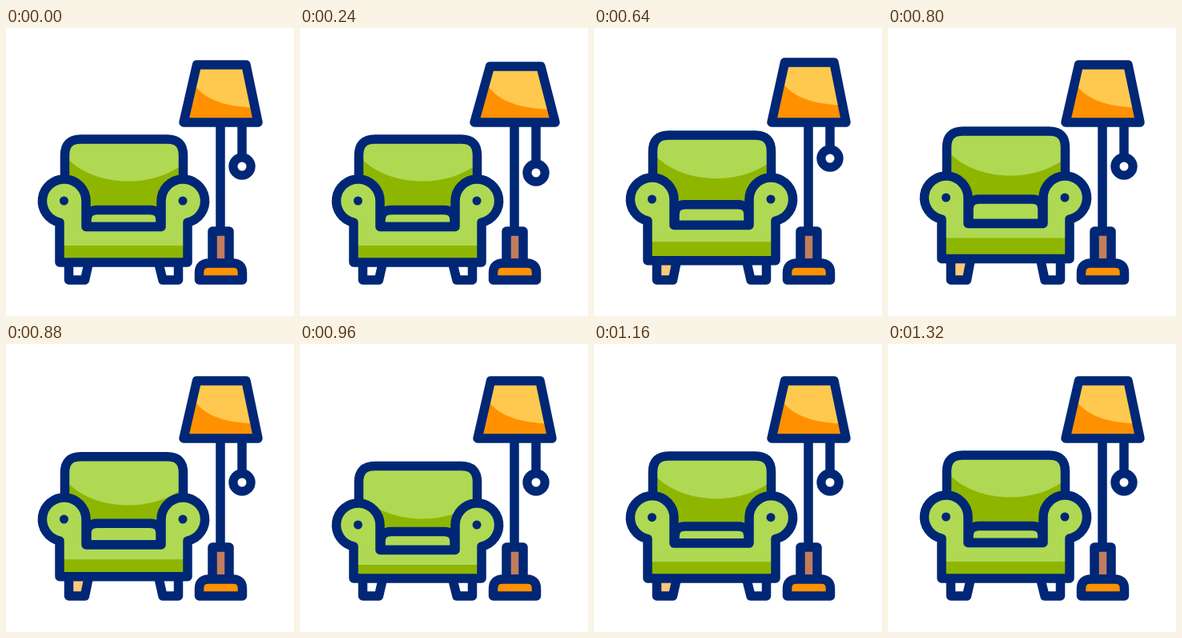
Write an HTML page with a canvas that moves like this. It is 360 px wide and 360 px high and loops after 2 s.

```html
<!DOCTYPE html>
<html lang="en">
<head>
<meta charset="utf-8">
<title>Armchair and lamp</title>
<style>
  html, body { margin: 0; height: 100%; overflow: hidden; background: #fff; }
  canvas { display: block; }
</style>
</head>
<body>
<canvas id="stage" width="360" height="360"></canvas>
<script>
const ctx = document.getElementById('stage').getContext('2d');
const NAVY = '#002776', LIME = '#afd953', GREEN = '#8eb600';
const ORANGE = '#ff9100', YELLOW = '#ffc94f', BROWN = '#c17d5d', PEACH = '#fbc977';
const LOOP = 2000, STEP = 40;

// Eased value at time t for [time, value] keys.
function tween(t, ...keys) {
  if (t <= keys[0][0]) return keys[0][1];
  for (let i = 1; i < keys.length; i++) {
    const [t0, a] = keys[i - 1], [t1, b] = keys[i];
    if (t < t1) return a + (b - a) * (1 - Math.cos(Math.PI * (t - t0) / (t1 - t0))) / 2;
  }
  return keys[keys.length - 1][1];
}
const lampTween = (t, squash, stretch) =>
  tween(t, [160, 0], [320, squash], [560, stretch], [720, 0]);
const chairTween = (t, up, down) =>
  tween(t, [480, 0], [800, up], [960, down], [1200, 0]);

// Outlined shape; an optional second path is a tone clipped inside it.
function shape(d, fill, tone, toneFill) {
  const path = new Path2D(d);
  if (fill) {
    ctx.fillStyle = fill;
    ctx.fill(path);
  }
  if (tone) {
    ctx.save();
    ctx.clip(path);
    ctx.fillStyle = toneFill;
    ctx.fill(new Path2D(tone));
    ctx.restore();
  }
  ctx.stroke(path);
}

function disc(x, y, r, fill) {
  ctx.beginPath();
  ctx.arc(x, y, r, 0, 7);
  ctx.fillStyle = fill;
  ctx.fill();
}

function drawLamp(t) {
  const wide = lampTween(t, 8, 0), top = 46 + lampTween(t, 4, -6);
  const ball = 173 + lampTween(t, 16, -20), edge = wide / 4;
  shape(`M268 118V254M295 118V${ball - 11}`);
  disc(295, ball, 16.7, NAVY);
  disc(295, ball, 5.5, '#fff');
  shape(`M${238.5 - edge} ${top}H${300 + edge}L${315 + wide} 118H${222 - wide}Z`, ORANGE,
    `M228 ${top}V${top + 12}C240 ${top + 42} 270 ${top + 54} 325 ${top + 54}V${top}Z`, YELLOW);
  shape('M258 294V254H279V294Z', BROWN);
  shape('M241.5 315V306Q241.5 294 253.5 294H283.5Q295.5 294 295.5 306V315Z', ORANGE);
}

function drawChair(t) {
  const top = 139 + chairTween(t, -10, 13.5);
  const shade = chairTween(t, -7, 27);
  const arm = 216 + chairTween(t, -4, 10);
  const seat = 248.5 + chairTween(t, -4, 9);
  const cushion = 227.5 + chairTween(t, -13.5, 7);
  const base = 293 + chairTween(t, -4.5, 0);
  const band = 272 + chairTween(t, -9.5, 4);

  const tinted = t >= 520 && t < 920 || t >= 1000 && t < 1280;
  shape(`M78.5 ${base}L78.5 315H98.5L103.5 ${base}`, tinted && PEACH);
  shape(`M215.5 ${base}L215.5 315H196L190.5 ${base}`);

  shape(`M73.5 ${seat}V${top + 20}Q73.5 ${top} 93.5 ${top}H201.5Q221.5 ${top} 221.5 ${top + 20}V${seat}Z`, GREEN,
    `M74 ${top}V${160 + shade}C105 ${197 + shade} 180 ${203 + shade} 221 ${170 + shade}V${top}Z`, LIME);
  shape(`M101 ${seat}V${cushion + 13}Q101 ${cushion} 114 ${cushion}H180` +
    `Q193 ${cushion} 193 ${cushion + 13}V${seat}Z`, LIME);
  shape(`M67 ${arm + 27}A27.3 27.3 0 1 1 100 ${arm}V${seat}H194V${arm}` +
    `A27.3 27.3 0 1 1 227 ${arm + 27}V${base}H67Z`, LIME,
    `M67 ${band}H227V300H67Z`, GREEN);
  disc(72.5, arm, 5.5, NAVY);
  disc(221, arm, 5.5, NAVY);
}

function frame(now) {
  const t = Math.floor(now % LOOP / STEP) * STEP;
  ctx.fillStyle = '#fff';
  ctx.fillRect(0, 0, 360, 360);
  ctx.strokeStyle = NAVY;
  ctx.lineWidth = 11.5;
  ctx.lineJoin = ctx.lineCap = 'round';
  drawLamp(t);
  drawChair(t);
  requestAnimationFrame(frame);
}
requestAnimationFrame(frame);
</script>
</body>
</html>
```
